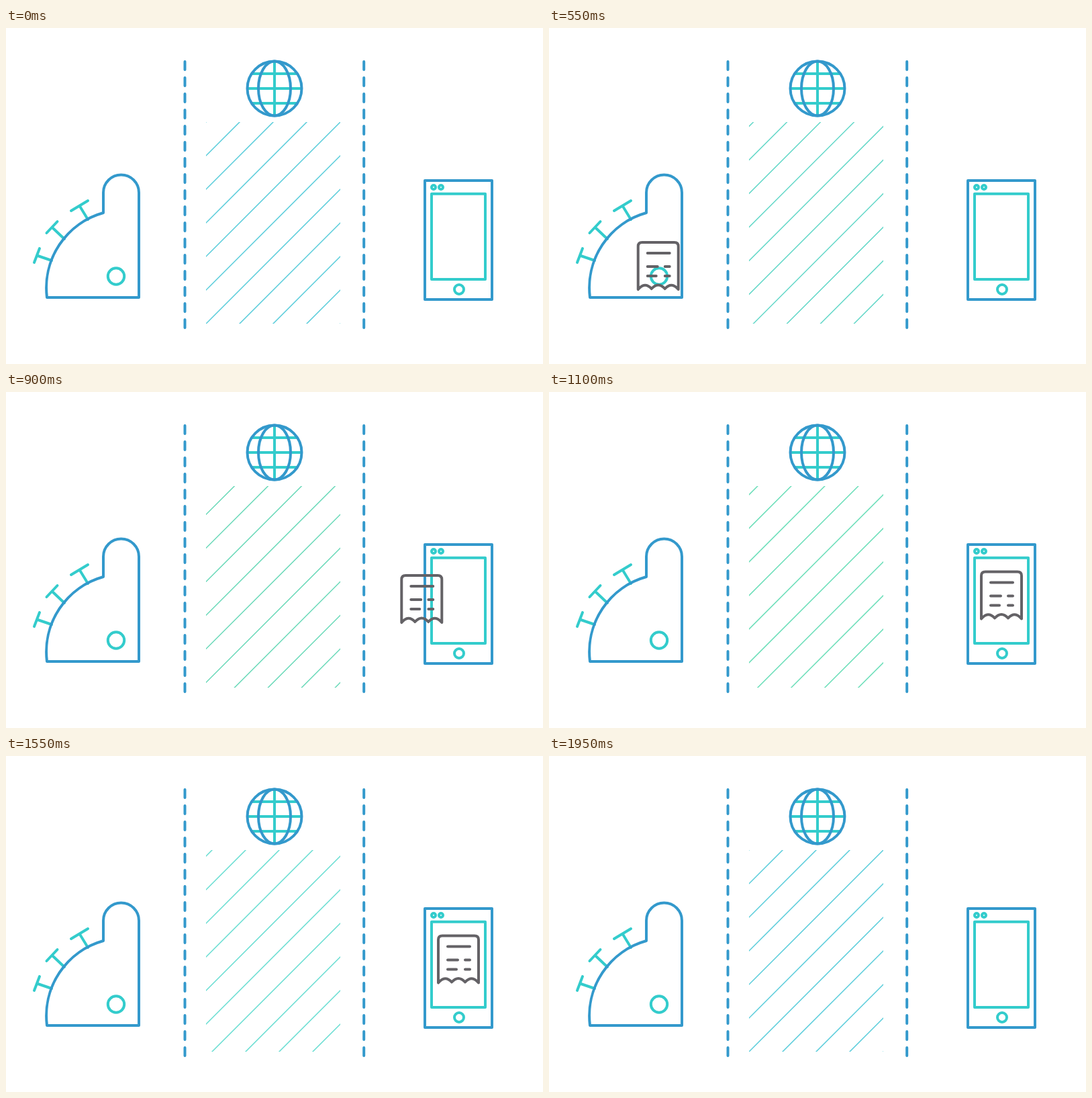
These frames come from a looping animation (800 by 500 pixels, 2000 ms). An HTML page:

```html
<!DOCTYPE html>
<html lang="en">
<head>
<meta charset="utf-8">
<title>Receipt to phone</title>
<style>
  html, body { margin: 0; width: 100%; height: 100%; overflow: hidden; background: #fff; }
  svg { display: block; width: 800px; height: 500px; }
  .line { fill: none; stroke-width: 4; stroke-linecap: round; stroke-linejoin: round; }
  .blue { stroke: #3399cc; }
  .teal { stroke: #33cccc; }
  .gray { stroke: #646266; }
</style>
</head>
<body>
<svg viewBox="0 0 800 500">
  <clipPath id="window"><rect x="298" y="140" width="200" height="300"/></clipPath>
  <g clip-path="url(#window)"><path id="stripes" fill="none" stroke-width="1.5"/></g>

  <!-- dividers -->
  <path class="line blue" stroke-dasharray="12 12" d="M266.5 50V446M533.2 50V446"/>

  <!-- globe -->
  <path class="line teal" d="M400 50V130M367 68H433M360 90H440M367 112H433"/>
  <g class="line blue">
    <circle cx="400" cy="90" r="40.5"/>
    <ellipse cx="400" cy="90" rx="24" ry="40.5"/>
  </g>

  <!-- cash register -->
  <g class="line teal">
    <path d="M122 285L109.5 264.5M97 272L122 257M87 314L68.5 296.5M60.5 305L76.5 288M68 346L46 338.5M42 349L50 328"/>
    <circle cx="164" cy="369.5" r="12.2"/>
  </g>
  <path class="line blue" d="M61 401H198V245A26.5 26.5 0 0 0 145 245V275A116 116 0 0 0 61 401Z"/>

  <!-- phone -->
  <rect class="line blue" x="624" y="227" width="100" height="177"/>
  <g class="line teal">
    <rect x="634" y="246.7" width="80" height="127.3"/>
    <circle cx="675" cy="389" r="7"/>
    <circle cx="637" cy="237" r="3"/>
    <circle cx="648" cy="237" r="3"/>
  </g>

  <!-- receipt, drawn around its centre -->
  <path id="receipt" class="line gray" d="M-30 35V-29Q-30 -35 -24 -35H24Q30 -35 30 -29V35Q20 23 10 34Q0 23 -10 34Q-20 23 -30 35Z
    M-16 -19H17M-16 1H-1M10 1H17M-16 15H-3M10 15H17"/>
</svg>
<script>
const LOOP = 2000, STEP = 50, GAP = 50;
const stripes = document.getElementById('stripes');
const receipt = document.getElementById('receipt');

const clamp = v => Math.min(1, Math.max(0, v));
const ramp = (t, from, to) => clamp((t - from) / (to - from));
const mix = (a, b, k) => a + (b - a) * k;
const ease = k => k * k * (3 - 2 * k);

// [time, red, green, blue]
const tints = [
  [0, 88, 204, 218], [350, 98, 218, 218], [750, 104, 214, 184],
  [1100, 106, 222, 184], [1350, 108, 226, 206], [1700, 100, 218, 212], [1950, 88, 204, 218]
];

function tintAt(t) {
  const i = Math.max(1, tints.findIndex(s => s[0] >= t));
  const a = tints[i - 1], b = tints[i], k = ramp(t, a[0], b[0]);
  return `rgb(${[1, 2, 3].map(c => Math.round(mix(a[c], b[c], k)))})`;
}

function stripePath(shift) {
  let d = '';
  for (let sum = 388 + shift % GAP; sum < 960; sum += GAP) {
    d += `M${sum - 130} 130L${sum - 450} 450`;
  }
  return d;
}

function draw(now) {
  const t = Math.floor(now % LOOP / STEP) * STEP;
  stripes.setAttribute('d', stripePath(t * 200 / (LOOP - STEP)));
  stripes.setAttribute('stroke', tintAt(t));

  const k = ease(ramp(t, 500, 1000));
  const x = mix(148, 674, k), y = mix(355.5, 302.5, k);
  receipt.setAttribute('transform', `translate(${x} ${y})`);
  receipt.setAttribute('opacity', ramp(t, 350, 500) * (1 - ramp(t, 1600, 1900)));
}

const start = performance.now();
function tick() {
  draw(performance.now() - start);
  requestAnimationFrame(tick);
}
draw(0);
requestAnimationFrame(tick);
</script>
</body>
</html>
```
